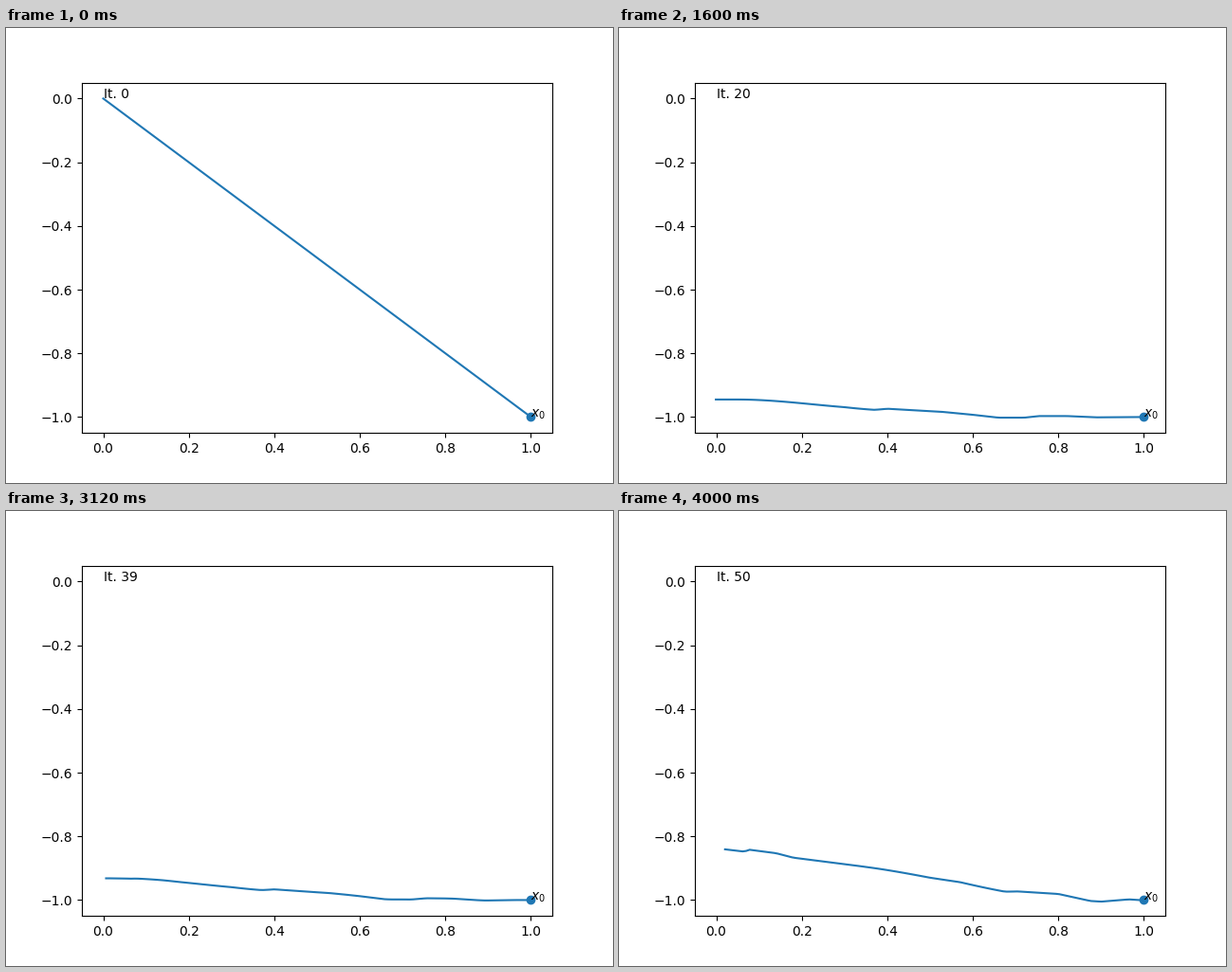
A matplotlib script that plays this animation: 640x480 px, repeating every 4080 ms.

```python
import numpy as np
import matplotlib.pyplot as plt
from matplotlib.animation import FuncAnimation

FRAMES, INTERVAL = 51, 80

# Corners (x, y) of the two rollouts that the later ones are built on.
WAVY = [(0, -.975), (.3, -.975), (.37, -.978), (.4, -.974), (.53, -.984),
        (.6, -.993), (.66, -1.002), (.72, -1.002), (.755, -.997),
        (.82, -.997), (.89, -1.001), (1, -1)]
SLOPED = [(.015, -.865), (.066, -.873), (.077, -.867), (.14, -.878),
          (.18, -.892), (.35, -.921), (.5, -.944), (.57, -.951),
          (.675, -.974), (.705, -.973), (.8, -.981), (.875, -1.003),
          (.9, -1.005), (.965, -.998), (1, -1.001)]


def ramp(v, a, b):
    """Rise linearly from 0 at a to 1 at b."""
    return np.clip((v - a) / (b - a), 0, 1)


def fade(x, a, b):
    """Fall smoothly from 1 at a to 0 at b."""
    t = 1 - ramp(x, a, b)
    return t * t * (3 - 2 * t)


def polyline(x, corners):
    return np.interp(x, *zip(*corners))


def trajectory(n):
    if n == 0:
        return [0, 1], [0, -1]
    # Progress of each stage: ripple, lift, settle, turn to the slope, raise.
    ripple = ramp(n, 7, 12)
    lift = ramp(n, 14, 20)
    settle = ramp(n, 20, 35)
    turn = .2 * ramp(n, 35, 42) + .8 * ramp(n, 42, 43)
    rise = ramp(n, 43, 49)

    left = -.0025 - .008 * ripple + .0095 * lift + .0065 * settle + .009 * turn + .006 * rise
    x = np.linspace(left, 1, 120)
    y = -1 + ripple * (polyline(x, WAVY) + 1)
    y += .03 * lift * fade(x, .05, .4) + .0045 * settle * fade(x, 0, .9)
    y += turn * (polyline(x, SLOPED) - y)
    y += .025 * rise * fade(x, .33, .7)
    return x, y


fig, ax = plt.subplots(figsize=(6.4, 4.8), dpi=100)
line, = ax.plot(*trajectory(0), color="C0")
ax.scatter([1], [-1], color="C0")
ax.set_xlim(-.05, 1.05)
ax.set_ylim(-1.05, .05)
ax.text(1, -1, "$x_0$")
label = ax.text(0, 0, "It. 0")


def update(n):
    line.set_data(*trajectory(n))
    label.set_text(f"It. {n}")
    return line, label


anim = FuncAnimation(fig, update, frames=FRAMES, interval=INTERVAL,
                     init_func=lambda: update(0), repeat=True, repeat_delay=0)
plt.show()
```
